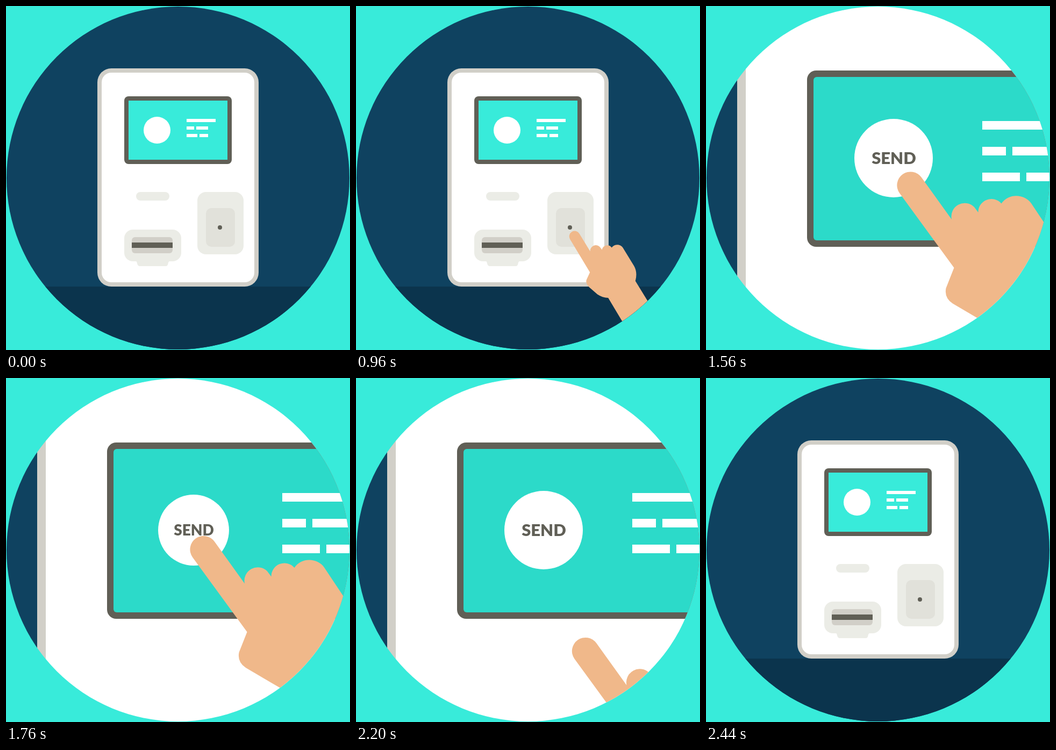
An HTML page for the animation above (3000 ms loop, 640 px wide and 640 px high).

```html
<!DOCTYPE html>
<html lang="en">
<head>
<meta charset="utf-8">
<title>Send at the terminal</title>
<style>
  html, body { margin: 0; width: 100%; height: 100%; overflow: hidden; background: #38ebda; }
  svg { display: block; width: 100vw; height: 100vh; }
  .navy { fill: #0f4260; }
  .floor { fill: #0b344d; }
  .rim { fill: #d1cfc8; }
  .white { fill: #fff; }
  .dark { fill: #605f56; }
  .aqua { fill: #38ebda; }
  .teal { fill: #2cdac9; }
  .pale { fill: #ebece6; }
  .grey { fill: #e1e1da; }
  .skin { fill: #f0b88a; }
  text { font: 900 31px Lato, "Open Sans", sans-serif; text-anchor: middle; }
</style>
</head>
<body>
<svg viewBox="0 0 640 640">
  <clipPath id="port"><circle cx="320" cy="320" r="319"/></clipPath>
  <g clip-path="url(#port)">

    <g id="wide">
      <rect class="navy" width="640" height="640"/>
      <rect class="floor" y="522" width="640" height="118"/>
      <rect class="rim" x="170" y="116" width="300" height="406" rx="26"/>
      <rect class="white" x="178" y="124" width="284" height="390" rx="18"/>

      <rect class="dark" x="220" y="168" width="200" height="126" rx="8"/>
      <rect class="aqua" x="228" y="176" width="184" height="110"/>
      <circle class="white" cx="281" cy="231" r="25"/>
      <path class="white" d="M336 210h54v6h-54zM336 224h14v6h-14zM354 224h22v6h-22zM336 238h20v6h-20zM360 238h16v6h-16z"/>

      <rect class="pale" x="242" y="346" width="62" height="16" rx="8"/>
      <rect class="pale" x="356" y="346" width="86" height="116" rx="16"/>
      <rect class="grey" x="372" y="376" width="54" height="72" rx="10"/>
      <circle class="dark" cx="398" cy="412" r="4"/>

      <rect class="pale" x="220" y="416" width="106" height="59" rx="16"/>
      <path class="pale" d="M240 474Q243 474 244 479Q245 484 249 484H297Q301 484 301.500 479Q302 475 306 474Z"/>
      <rect class="rim" x="234" y="430" width="76" height="30" rx="6"/>
      <rect class="dark" x="234" y="440" width="76" height="10"/>

      <path id="arm" class="skin" d="M310 259.500A10 10 0 0 1 327.300 249L347.500 282
        A10.500 10.500 0 0 1 366.500 275L369.500 279A10 10 0 0 1 387.500 275
        C393 268 405 267.500 410 278L429 309Q436 321 431.500 337L540 514Q546 527 546 546L556 680H485
        L476 599L469.500 545L464.500 513Q464.500 508 462 504L381 368.500Q370 368 361 362L345.500 348.500Q338 341 341 334L347 321Z"/>
    </g>

    <g id="close" visibility="hidden">
      <rect class="navy" width="58" height="640"/>
      <rect class="rim" x="58" width="16" height="640"/>
      <rect class="white" x="74" width="566" height="640"/>
      <rect class="dark" x="188" y="120" width="520" height="328" rx="17"/>
      <rect class="teal" x="200" y="132" width="496" height="304" rx="6"/>
      <path class="white" d="M514 214h172v16h-172zM514 262h44v16h-44zM570 262h70v16h-70zM514 310h70v16h-70zM596 310h43v16h-43z"/>

      <g id="button">
        <circle class="white" cx="349" cy="283" r="73"/>
        <text class="dark" x="349.500" y="294">SEND</text>
      </g>

      <path id="hand" class="skin" d="M360 348A25 25 0 0 1 401 319L457 397
        A25 25 0 0 1 499 374L506.500 384A24.500 24.500 0 0 1 549.500 367.500
        C563 348 592 349 605 367L629 403L800 660V760L640 660L504 580L459 553.500Q443 543 446.500 525L461.500 487Z"/>
    </g>
  </g>
</svg>
<script>
  const LOOP = 3000, STEP = 40;
  const CUT_IN = 1320, CUT_OUT = 2240, GONE = 2440;
  const el = id => document.getElementById(id);
  const [wide, close, arm, hand, button] = ["wide", "close", "arm", "hand", "button"].map(el);

  const span = (t, a, b) => Math.min(1, Math.max(0, (t - a) / (b - a)));
  const smooth = p => p * p * (3 - 2 * p);
  const show = (node, on) => node.setAttribute("visibility", on ? "inherit" : "hidden");
  const move = (node, x, y) => node.setAttribute("transform", `translate(${x} ${y})`);

  // Reach in along a straight line with a slight overshoot, leave on a curve.
  function poseArm(t) {
    const out = span(t, 2040, GONE);
    const reach = 395 - 398 * smooth(span(t, 720, 1200)) + 3 * smooth(span(t, 1200, 1280));
    show(arm, t >= 760 && t < GONE);
    move(arm, 0.45 * reach + 160 * out ** 3, 0.89 * reach + 350 * out ** 2);
  }

  function poseHand(t) {
    const press = Math.sin(Math.PI * span(t, 1520, 1920)) ** 2;
    const back = 13.3 * (10 * span(t, 2040, GONE)) ** 1.85;
    move(hand, 1.5 - 16 * press + 0.26 * back, 1.7 - 18 * press + back);

    const size = 1 - 0.1 * smooth(span(press, 0.15, 1));
    button.setAttribute("transform", `translate(349 283) scale(${size}) translate(-349 -283)`);
  }

  function draw(t) {
    const near = t >= CUT_IN && t < CUT_OUT;
    show(wide, !near);
    show(close, near);
    if (near) {
      show(arm, false);
      poseHand(t);
    } else {
      poseArm(t);
    }
  }

  // Motion advances at 25 pictures per second.
  const start = performance.now();
  function tick() {
    const t = (performance.now() - start) % LOOP;
    draw(Math.floor(t / STEP) * STEP);
    requestAnimationFrame(tick);
  }
  draw(0);
  requestAnimationFrame(tick);
</script>
</body>
</html>
```
